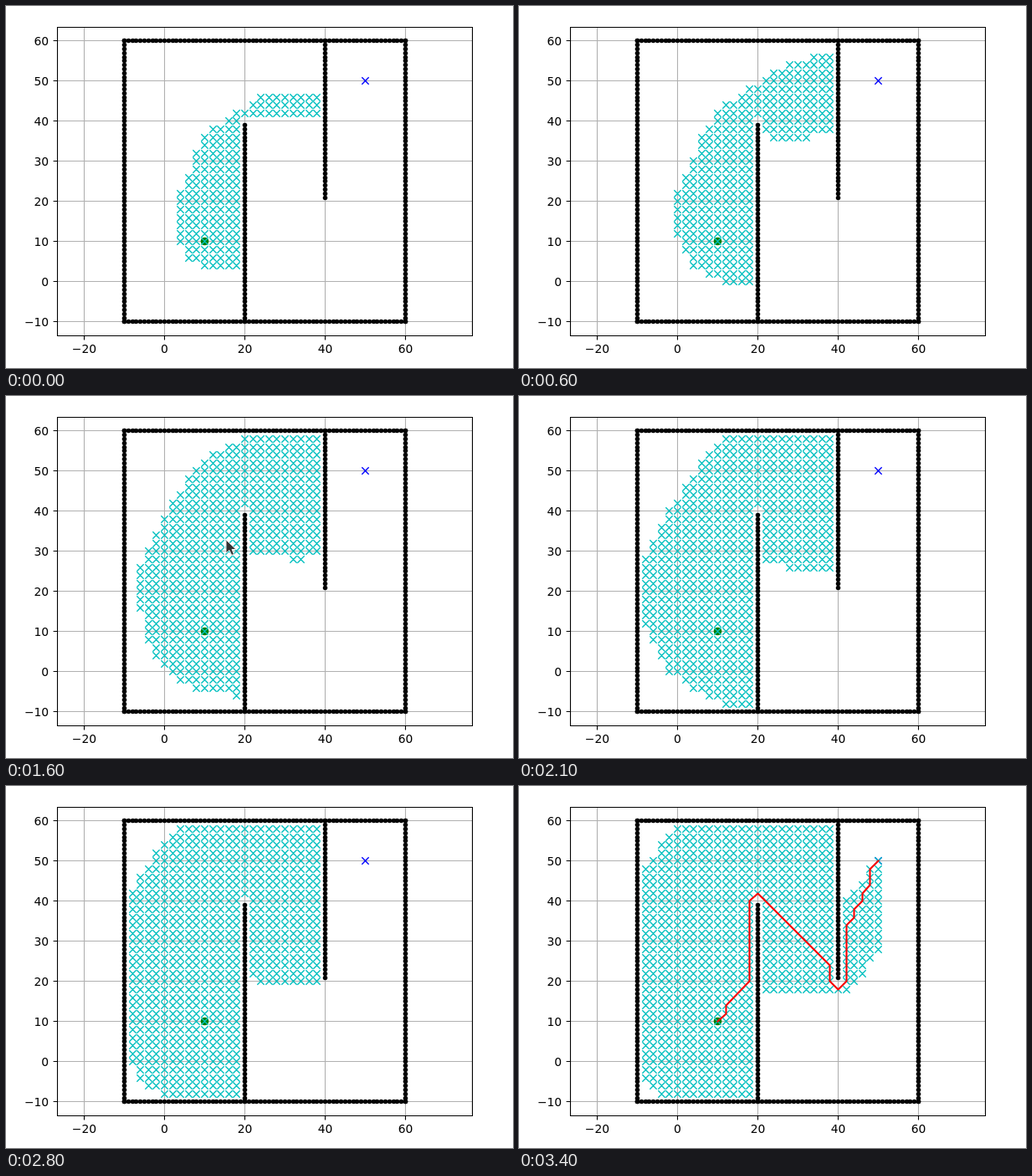
An HTML page for the animation above (4.5 s loop, 606x433 px).

```html
<!DOCTYPE html>
<html lang="en">
<head>
<meta charset="utf-8">
<title>Grid search</title>
<style>
  html, body { margin: 0; width: 100%; height: 100%; overflow: hidden; background: #fff; }
  svg { display: block; width: 606px; height: 433px; }
  path { fill: none; }
  text { font: 13.89px "DejaVu Sans", sans-serif; }
  .grid { stroke: #b0b0b0; stroke-width: 1.11; }
  .axes { stroke: #000; stroke-width: 1.11; }
  .cross { stroke-width: 1.39; }
  #walls { fill: #000; }
  #route { stroke: #f00; stroke-width: 2.08; stroke-linejoin: round; stroke-linecap: square; }
  #pointer { fill: #333; stroke: #eee; stroke-width: 1; }
</style>
</head>
<body>
<svg viewBox="0 0 606 433">
  <path id="grid" class="grid"/>
  <g id="walls"></g>
  <circle id="start" r="4.86" fill="#008000"/>
  <path id="goal" class="cross" stroke="#00f"/>
  <path id="visited" class="cross" stroke="#00bfbf"/>
  <path id="route"/>
  <path id="axes" class="axes"/>
  <g id="labels"></g>
  <path id="pointer" d="M0 0V16L4 12.5L6.8 18.5L9.5 17.3L7 11.5H12Z"/>
</svg>
<script>
const LOOP = 4500, STEP = 100, LAST = 34, CELL = 2;
const START = [10, 10], GOAL = [50, 50];
const $ = id => document.getElementById(id);
const px = x => Math.round(189 + 4.8 * x) + 0.5;
const py = y => Math.round(329.4 - 4.8 * y) + 0.5;
const cross = ([x, y]) => {
  const r = 4.17, X = px(x), Y = py(y);
  return `M${X - r} ${Y - r}L${X + r} ${Y + r}M${X - r} ${Y + r}L${X + r} ${Y - r}`;
};
function add(parent, tag, attrs, text = "") {
  const el = document.createElementNS("http://www.w3.org/2000/svg", tag);
  for (const key in attrs) el.setAttribute(key, attrs[key]);
  el.textContent = text;
  parent.append(el);
}

// Walls: a square room with two partitions
const walls = [];
for (let i = -10; i <= 60; i++) {
  walls.push([i, -10], [i, 60], [-10, i], [60, i]);
  if (i < 40) walls.push([20, i]);
  if (i > 20) walls.push([40, i]);
}

// A* over the grid; returns the cells in the order they are expanded
function search() {
  const key = (x, y) => x * 1000 + y;
  const blocked = new Set();
  for (let x = -10; x <= 60; x += CELL)
    for (let y = -10; y <= 60; y += CELL)
      if (walls.some(([a, b]) => (a - x) ** 2 + (b - y) ** 2 <= 1)) blocked.add(key(x, y));

  const d = Math.sqrt(2);
  const moves = [[1, 0, 1], [0, 1, 1], [-1, 0, 1], [0, -1, 1],
                 [-1, -1, d], [-1, 1, d], [1, -1, d], [1, 1, d]];
  const rest = (x, y) => Math.sqrt(((GOAL[0] - x) / CELL) ** 2 + ((GOAL[1] - y) / CELL) ** 2);
  const open = new Map([[key(...START), { x: START[0], y: START[1], cost: 0 }]]);
  const closed = new Set(), order = [];

  while (open.size) {
    let best, bestId, low = Infinity;
    for (const [id, n] of open) {
      const f = n.cost + rest(n.x, n.y);
      if (f < low) { low = f; best = n; bestId = id; }
    }
    order.push([best.x, best.y]);
    if (best.x === GOAL[0] && best.y === GOAL[1]) break;
    open.delete(bestId);
    closed.add(bestId);
    for (const [dx, dy, c] of moves) {
      const x = best.x + dx * CELL, y = best.y + dy * CELL, id = key(x, y);
      if (blocked.has(id) || closed.has(id)) continue;
      const cost = best.cost + c, known = open.get(id);
      if (!known || known.cost > cost) open.set(id, { x, y, cost });
    }
  }
  return order;
}

// Piecewise linear lookup in rows of [position, ...values]
function lerp(rows, at) {
  let i = 1;
  while (i < rows.length - 1 && rows[i][0] < at) i++;
  const a = rows[i - 1], b = rows[i], k = (at - a[0]) / (b[0] - a[0]);
  return a.slice(1).map((v, j) => v + (b[j + 1] - v) * k);
}

// Static plot
let gridPath = "", axesPath = "M61.5 25.5H557.5V394.5H61.5Z";
for (let v = -20; v <= 60; v += 10) {
  const label = String(v).replace("-", "\u2212");
  if (v % 20 === 0) {
    gridPath += `M${px(v)} 25V394`;
    axesPath += `M${px(v)} 394.5v4.9`;
    add($("labels"), "text", { x: px(v), y: 415, "text-anchor": "middle" }, label);
  }
  if (v >= -10) {
    gridPath += `M61 ${py(v)}H557`;
    axesPath += `M61.5 ${py(v)}h-4.9`;
    add($("labels"), "text", { x: 51.2, y: py(v) + 5, "text-anchor": "end" }, label);
  }
}
$("grid").setAttribute("d", gridPath);
$("axes").setAttribute("d", axesPath);
for (const [x, y] of walls) add($("walls"), "circle", { cx: px(x), cy: py(y), r: 2.78 });
$("start").setAttribute("cx", px(START[0]));
$("start").setAttribute("cy", py(START[1]));
$("goal").setAttribute("d", cross(GOAL));

const route = [START, [12, 12], [12, 14], [18, 20], [18, 40], [20, 42], [38, 24], [38, 20],
  [40, 18], [42, 20], [42, 34], [44, 36], [44, 38], [46, 40], [46, 42], [48, 44], [48, 48], GOAL];
$("route").setAttribute("d", "M" + route.map(([x, y]) => `${px(x)} ${py(y)}`).join("L"));

// Motion
const marks = search().map(cross);
const progress = [[0, 151], [10, 351], [16, 451], [21, 521], [28, 631], [33, 711]];
const pointerTrack = [[14, 362, 373], [16, 263, 172], [18, 144, 25]];
let shown = -1;

function draw() {
  const step = Math.min(LAST, Math.floor(performance.now() % LOOP / STEP));
  if (step !== shown) {
    shown = step;
    const done = step === LAST;
    const count = done ? marks.length : Math.round((lerp(progress, step)[0] - 1) / 10) * 10 + 1;
    $("visited").setAttribute("d", marks.slice(0, count).join(""));
    $("route").style.display = done ? "" : "none";
    const pointing = step >= 14 && step <= 18;
    $("pointer").style.display = pointing ? "" : "none";
    if (pointing) $("pointer").setAttribute("transform", `translate(${lerp(pointerTrack, step)})`);
  }
  requestAnimationFrame(draw);
}
draw();
</script>
</body>
</html>
```
